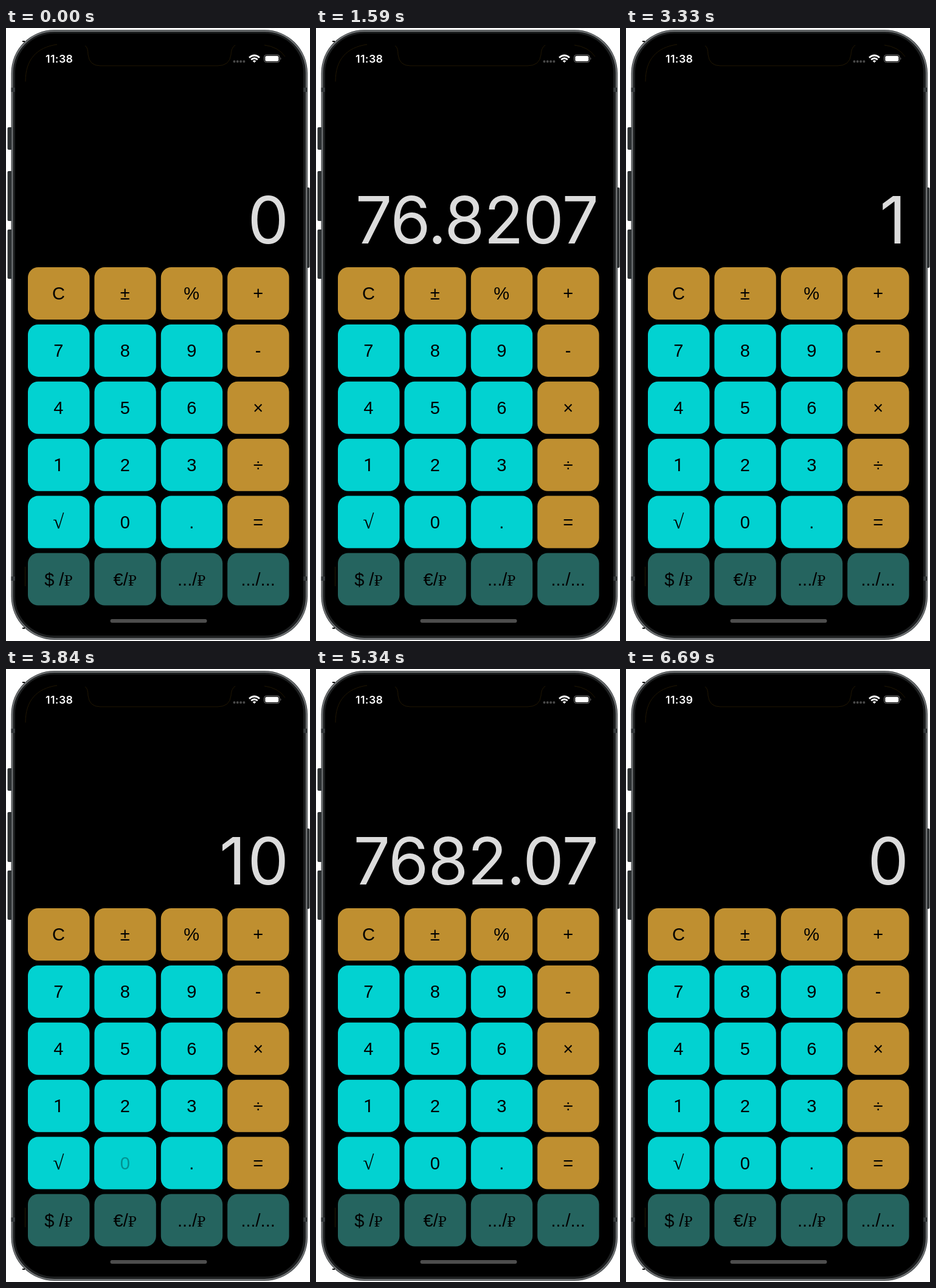
An HTML page for the animation above (6720 ms loop, 500 by 1007 pixels).

```html
<!DOCTYPE html>
<html lang="en">
<head>
<meta charset="utf-8">
<title>Calculator</title>
<style>
  html, body { margin: 0; width: 100%; height: 100%; overflow: hidden; background: #fff; }
  svg { display: block; width: 500px; height: 1007px; }
  .label { font: 29px "Liberation Sans", Arial, sans-serif; text-anchor: middle; white-space: pre; }
  .ruble { font: 24px "Liberation Serif", "Noto Serif", serif; }
  .root { font: 33px "Liberation Serif", "Noto Serif", serif; }
  .one { font-family: Roboto, sans-serif; }
  #value { font: 400 107px Inter, "Liberation Sans", sans-serif; letter-spacing: -1.2px; text-anchor: end; fill: #dcdcdc; }
  #value .wide { letter-spacing: 3px; }
  #clock { font: 600 17.8px Inter, "Liberation Sans", sans-serif; letter-spacing: .4px; text-anchor: middle; fill: #fff; }
</style>
</head>
<body>
<svg viewBox="0 0 500 1007">
  <g fill="#2b2f31">
    <rect x="2.500" y="163" width="9" height="37" rx="2"/>
    <rect x="2.500" y="235" width="9" height="82" rx="2"/>
    <rect x="2.500" y="331" width="9" height="81" rx="2"/>
    <rect x="491" y="262" width="8.500" height="132" rx="2"/>
  </g>
  <rect x="8.500" y="3" width="487.500" height="1002" rx="71" fill="#3b3f41"/>
  <rect x="10.500" y="5" width="483.500" height="998" rx="69" fill="#1c1e1f" stroke="#727577" stroke-width="2"/>
  <g fill="#34383a">
    <rect x="8.500" y="98" width="6.500" height="7"/>
    <rect x="489" y="98" width="7" height="7"/>
    <rect x="8.500" y="901" width="6.500" height="7"/>
    <rect x="489" y="901" width="7" height="7"/>
  </g>
  <rect x="15" y="9" width="474" height="989" rx="64"/>
  <path d="M27 22h4M27 986h4" stroke="#000" stroke-width="2"/>
  <path d="M32 88C32 52 50 32 84 27M130 29Q135 32 135 44Q137 62 155 62H348Q368 62 370 44Q370 33 377 28M425 28Q448 31 459 47M31.500 885V917"
    fill="none" stroke="#211703"/>
  <text id="clock" x="87.700" y="57"></text>
  <g fill="#4a4a4a">
    <circle cx="375.500" cy="55" r="2"/><circle cx="380.800" cy="55" r="2"/>
    <circle cx="386.100" cy="55" r="2"/><circle cx="391.400" cy="55" r="2"/>
  </g>
  <g fill="none" stroke="#fff" stroke-width="2.700">
    <path d="M400 48.700Q408.500 41.300 417 48.700M403.200 52Q408.500 47.500 413.800 52"/>
    <path d="M408.500 57L405.700 54.200Q408.500 52 411.300 54.200Z" fill="#fff" stroke="none"/>
  </g>
  <rect x="424.500" y="44" width="25.500" height="12.500" rx="4" fill="none" stroke="#777"/>
  <rect x="426.300" y="45.800" width="22" height="9" rx="2.500" fill="#fff"/>
  <path d="M451.500 48.300q2 2 0 4z" fill="#777"/>
  <text id="value" x="463.800" y="353.800"></text>
  <g id="keys"></g>
  <rect x="171.500" y="971" width="159" height="6" rx="3" fill="#4d4d4d"/>
</svg>
<script>
const LOOP = 6720, STEP = 30;
const AMBER = '#bf8f30', CYAN = '#02d2d1', TEAL = '#25645f';
const ROWS = [
  ['C', '±', '%', '+'],
  ['7', '8', '9', '-'],
  ['4', '5', '6', '×'],
  ['1', '2', '3', '÷'],
  ['√', '0', '.', '='],
  ['$ /₽', '€/₽', '.../₽', '.../...']
];
const KEY_FONTS = { '√': 'root', '₽': 'ruble', '1': 'one' };
const VALUE_FONTS = { '1': 'wide' };

// start time, key, value shown afterwards
const PRESSES = [
  [1290, '$ /₽', '76.8207'],
  [2460, 'C', '0'],
  [3150, '1', '1'],
  [3540, '0', '10'],
  [3840, '0', '100'],
  [4710, '$ /₽', '7682.07'],
  [6420, 'C', '0']
];
const REACT = 60, MINUTE = 6510;
const SCALE = [[0, 1.005], [30, 1.07], [60, 1.1], [90, 1.02], [120, 1]];
const FADE = [[0, 0.3], [45, 0.25], [90, 0.45], [180, 1]];

const keys = {};
const byId = id => document.getElementById(id);

function add(parent, tag, attrs, text = '') {
  const el = document.createElementNS('http://www.w3.org/2000/svg', tag);
  for (const name in attrs) el.setAttribute(name, attrs[name]);
  el.textContent = text;
  return parent.appendChild(el);
}

function write(el, text, fonts) {
  if (el.textContent === text) return;
  el.textContent = '';
  for (const ch of text) add(el, 'tspan', { class: fonts[ch] ?? '' }, ch);
}

function makeKey(text, row, col) {
  const fill = row === 5 ? TEAL : row === 0 || col === 3 ? AMBER : CYAN;
  const x = 86.7 + col * 109.4, y = 436 + row * 93.9;
  const box = add(byId('keys'), 'g', {});
  add(box, 'rect', { x: -50.7, y: -43, width: 101.4, height: 86, rx: 17, fill });
  const label = add(box, 'text', { class: 'label', x: -0.3, y: 10 });
  write(label, text, KEY_FONTS);
  keys[text] = { box, label, x, y };
}

function mix(points, t) {
  if (t < 0) return 1;
  for (let i = 1; i < points.length; i++) {
    const [t0, a] = points[i - 1], [t1, b] = points[i];
    if (t <= t1) return a + (b - a) * (t - t0) / (t1 - t0);
  }
  return 1;
}

function render(t) {
  let value = '0';
  const active = {};
  for (const [start, key, result] of PRESSES) {
    if (t >= start + REACT) value = result;
    if (t >= start) active[key] = t - start;
  }
  for (const name in keys) {
    const { box, label, x, y } = keys[name];
    const age = active[name] ?? -1;
    box.setAttribute('transform', `translate(${x} ${y}) scale(${mix(SCALE, age)})`);
    label.setAttribute('opacity', mix(FADE, age));
  }
  write(byId('value'), value, VALUE_FONTS);
  byId('clock').textContent = t < MINUTE ? '11:38' : '11:39';
}

ROWS.forEach((row, r) => row.forEach((text, c) => makeKey(text, r, c)));
render(0);

const begin = performance.now();
function tick() {
  const t = (performance.now() - begin) % LOOP;
  render(Math.floor(t / STEP) * STEP);
  requestAnimationFrame(tick);
}
requestAnimationFrame(tick);
</script>
</body>
</html>
```
